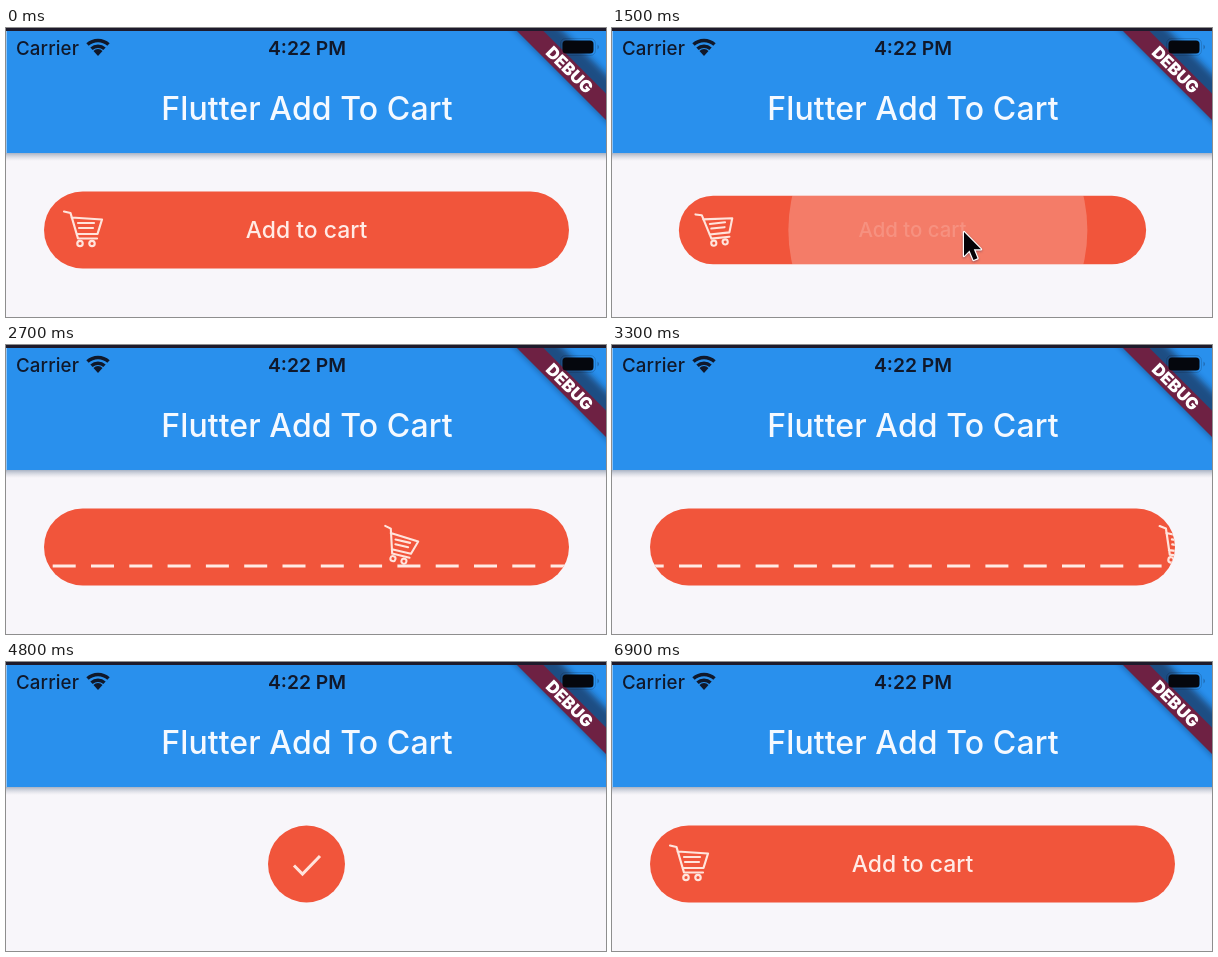
These frames come from a looping animation (600 by 289 pixels, 8300 ms). An HTML page:

```html
<!DOCTYPE html>
<html lang="en">
<head>
<meta charset="utf-8">
<title>Flutter Add To Cart</title>
<style>
  html, body { margin: 0; width: 100%; height: 100%; overflow: hidden; background: #f8f6fa; }
  svg { display: block; width: 100vw; height: 100vh; }
  text { font-family: Inter, Roboto, sans-serif; }
  .line { fill: none; stroke: #ffe4dc; stroke-width: 2.2; stroke-linecap: round; stroke-linejoin: round; }
  #check { stroke-width: 3; stroke-linecap: butt; stroke-linejoin: miter; }
  #cursor { filter: drop-shadow(0 1px 1px #50305080); }
</style>
</head>
<body>
<svg viewBox="0 0 600 289" preserveAspectRatio="none">
  <defs>
    <linearGradient id="shade" x2="0" y2="1">
      <stop stop-color="#7d8ea6" stop-opacity=".65"/>
      <stop offset="1" stop-color="#b9bcc8" stop-opacity="0"/>
    </linearGradient>
    <filter id="soft" x="-20%" y="-20%" width="140%" height="140%"><feGaussianBlur stdDeviation="3"/></filter>
    <clipPath id="clip"><rect class="pill"/></clipPath>
    <clipPath id="screen"><rect y="3" width="600" height="286"/></clipPath>
  </defs>

  <rect width="600" height="289" fill="#f8f6fa"/>
  <rect y="125" width="600" height="8" fill="url(#shade)"/>
  <rect width="600" height="125" fill="#2990ed"/>
  <rect width="1" height="125" fill="#8fc3f4"/>
  <rect width="600" height="3" fill="#1e1b2c"/>
  <g clip-path="url(#screen)">
    <path d="M498-10H544L620 66V112Z" fill="#12203c" opacity=".6" filter="url(#soft)"/>
    <path d="M508 0H534.500L600 65.500V92Z" fill="#6e2143"/>
    <text transform="translate(563.500 42) rotate(45)" y="5.800" text-anchor="middle" font-size="16.800" font-weight="900" fill="#fff">DEBUG</text>
  </g>
  <g fill="#10182a">
    <text x="10" y="26.500" font-size="18.700" font-weight="500" letter-spacing=".15">Carrier</text>
    <text x="301" y="26.500" font-size="19.300" font-weight="600" text-anchor="middle">4:22 PM</text>
    <path d="M92 28l-4.500-5a6 6 0 0 1 9 0z"/>
    <path d="M81.500 16.500a15.500 15.500 0 0 1 21 0M85.500 20.700a9.500 9.500 0 0 1 13 0" fill="none" stroke="#10182a" stroke-width="3.500"/>
    <rect x="556.500" y="12.500" width="31" height="13" rx="3.500" fill="#05070d"/>
    <rect x="554.500" y="10.500" width="35" height="17" rx="5" fill="none" stroke="#10182a" stroke-opacity=".18"/>
    <path d="M591.500 16.500q3 2.500 0 5z" opacity=".3"/>
  </g>
  <text x="301" y="91.500" font-size="32" font-weight="550" letter-spacing=".1" text-anchor="middle" fill="#f4f9ff">Flutter Add To Cart</text>

  <g id="button">
    <rect class="pill" fill="#f1553b"/>
    <g clip-path="url(#clip)">
      <text id="label" x="300.500" y="210" font-size="22.900" font-weight="500" text-anchor="middle" fill="#ffebe6">Add to cart</text>
      <line id="road" y1="221" y2="221" stroke="#ffeae4" stroke-width="3" stroke-dasharray="23 15.3"/>
      <g id="cart" class="line">
        <path d="M-19-17.500l6.500 1.500L-5 9.500H14M-11.500-11.500L19-9.500L14.500 5H-6.500M-5-6H11M-4-1H10"/>
        <circle cx="-3" cy="14.500" r="2.700"/>
        <circle cx="9" cy="14.500" r="2.700"/>
      </g>
      <circle id="splash" cy="202" fill="#fff"/>
    </g>
    <path id="check" class="line" d="M288 203.500l8.500 8.500l17.500-18" pathLength="1" stroke-dasharray="1 2"/>
  </g>
  <path id="cursor" d="M0 0V24L5.500 18.500L9.500 28L13.500 26.300L9.800 17.300H17Z" fill="#050308" stroke="#fff" stroke-width="2.400" paint-order="stroke" stroke-linejoin="round"/>
</svg>
<script>
const LOOP = 8300, STEP = 100;
const MID = 300.5, ROW = 202, FULL = 525, TALL = 77;
const PERIOD = 38.3, DASHES = 28;
const $ = id => document.getElementById(id);
const pills = document.querySelectorAll('.pill');

const set = (el, attrs) => {
  for (const name in attrs) el.setAttribute(name, attrs[name]);
};
const progress = (t, from, to) => Math.min(1, Math.max(0, (t - from) / (to - from)));
const sine = u => (1 - Math.cos(Math.PI * u)) / 2;

// Linear track through [time, value] pairs
function track(t, ...keys) {
  let [t0, v0] = keys[0];
  for (const [t1, v1] of keys) {
    if (t < t1) return v0 + (v1 - v0) * progress(t, t0, t1);
    [t0, v0] = [t1, v1];
  }
  return v0;
}

function pillWidth(t) {
  if (t < 5300) return FULL - (FULL - TALL) * sine(progress(t, 4050, 4550));
  const u = progress(t, 6350, 6700);
  return FULL * u * (2 - u);
}

function drawButton(t) {
  const w = pillWidth(t), h = Math.min(w, TALL);
  for (const pill of pills) {
    set(pill, { x: MID - w / 2, y: ROW - h / 2, width: w, height: h, rx: h / 2 });
  }
  const scale = track(t, [1300, 1], [1400, .95], [1500, .89], [1600, .94], [1700, 1],
    [4900, 1], [5000, 1.17], [5100, .6], [5200, 0], [5300, 0], [5301, 1]);
  set($('button'), { transform: `translate(${MID} ${ROW}) scale(${scale}) translate(${-MID} ${-ROW})` });

  const back = progress(t, 6500, 6800);
  set($('label'), { opacity: Math.max(1 - track(t, [1300, 0], [1400, .35], [1500, .82], [1600, 1]), back) });
  set($('splash'), {
    cx: track(t, [1400, 350], [1500, 329], [1700, MID]),
    r: track(t, [1300, 0], [1400, 70], [1500, 168], [1700, 330]),
    opacity: track(t, [1300, 0], [1400, .23], [1600, .23], [2000, 0])
  });
  set($('check'), {
    'stroke-dashoffset': 1 - progress(t, 4450, 4750),
    opacity: t > 4450 && t < 5300 ? 1 : 0
  });
}

function drawRide(t) {
  const home = t > 5300;
  const x = home ? 77 : 77 + 523 * sine(progress(t, 1415, 3683));
  const tilt = home ? 0 : track(t, [1400, 0], [1500, -6], [1650, -4], [2000, 14], [2500, 15], [3300, 8], [3600, 0]);
  const size = home ? 1 : track(t, [1400, 1], [1500, 1.07], [1700, .92], [2500, .92], [3300, 1]);
  set($('cart'), {
    transform: `translate(${x} 201) rotate(${tilt}) scale(${size})`,
    opacity: home ? progress(t, 6500, 6800) : t < 3700 ? 1 : 0
  });
  const front = 486 - .796 * (t - 2100);
  set($('road'), {
    x1: front, x2: front + PERIOD * (DASHES - 1) + 23,
    opacity: t > 1900 && t < 4050 ? 1 : 0
  });
}

function drawCursor(t) {
  const tap = t < 3000;
  const u = sine(tap ? progress(t, 800, 1200) : progress(t, 5600, 6200));
  const [x, y] = tap
    ? [385 - 33 * u, 252 - 48 * u]
    : [322 - 20.5 * u, 240 - 42 * u];
  set($('cursor'), {
    transform: `translate(${x} ${y})`,
    opacity: t >= 900 && t < 1900 || t >= 5700 && t < 6600 ? 1 : 0
  });
}

function frame(now) {
  const t = Math.floor(now % LOOP / STEP) * STEP;
  drawButton(t);
  drawRide(t);
  drawCursor(t);
  requestAnimationFrame(frame);
}
frame(0);
</script>
</body>
</html>
```
